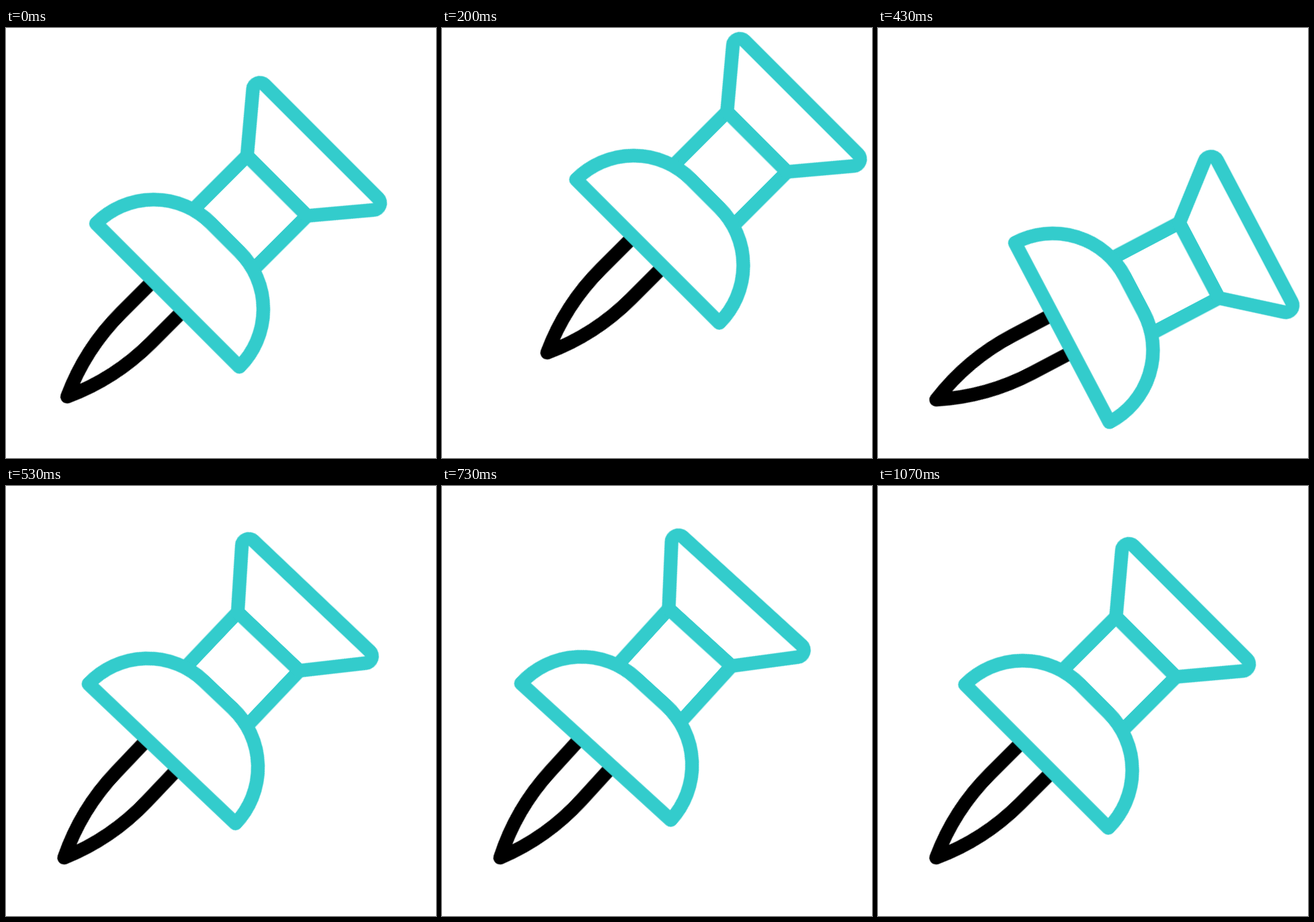
Recreate the animation shown at these times as an HTML page without scripts. Size 640x640 px, loop 1670 ms.

```html
<!DOCTYPE html>
<html lang="en">
<head>
<meta charset="utf-8">
<title>Push pin</title>
<style>
  html, body { margin: 0; width: 100%; height: 100%; overflow: hidden; background: #fff; }
  svg { display: block; width: 100%; height: 100%; }

  .pin {
    fill: none;
    stroke-width: 20.4;
    stroke-linejoin: round;
    transform: rotate(45deg);
    transform-origin: 0 0;
    animation: stab 1.67s infinite;
    animation-timing-function: cubic-bezier(.333, 0, .667, 1);
  }
  .needle { stroke: #000; }
  .head { stroke: #33cccc; }

  /* pull out along the axis, stab in, then wobble about the tip */
  @keyframes stab {
    0% {
      transform: rotate(45deg) translateY(-6.1px);
      animation-timing-function: cubic-bezier(.333, .231, .667, 1);
    }
    11.98% { transform: rotate(45deg) translateY(-99px); }
    19.2% { transform: rotate(45deg) translateY(0); }
    25.15% { transform: rotate(62.5deg) translateY(0); }
    37.43% { transform: rotate(28.7deg) translateY(0); }
    48.8% { transform: rotate(52deg) translateY(0); }
    63.7%, 100% { transform: rotate(45deg) translateY(0); }
  }
</style>
</head>
<body>
<svg viewBox="0 0 640 640">
  <!-- the needle tip is the local zero point, the pin points up -->
  <g transform="translate(86.6 553.2)">
    <g class="pin">
      <path class="needle" d="M-31.5-208V-145A350 350 0 0 0 0 0A350 350 0 0 0 31.5-145V-208"/>
      <g class="head" transform="translate(-1 0)">
        <path d="M-63.2-330V-442.7M63.2-330V-442.7"/>
        <path d="M-150.9-212.5A120.9 121.3 0 0 1-30-333.8H30A120.9 121.3 0 0 1 150.9-212.5Z"/>
        <path d="M-63.2-442.7L-127.3-519.2A10.25 10.25 0 0 1-119.5-536H119.5A10.25 10.25 0 0 1 127.3-519.2L63.2-442.7Z"/>
      </g>
    </g>
  </g>
</svg>
</body>
</html>
```
